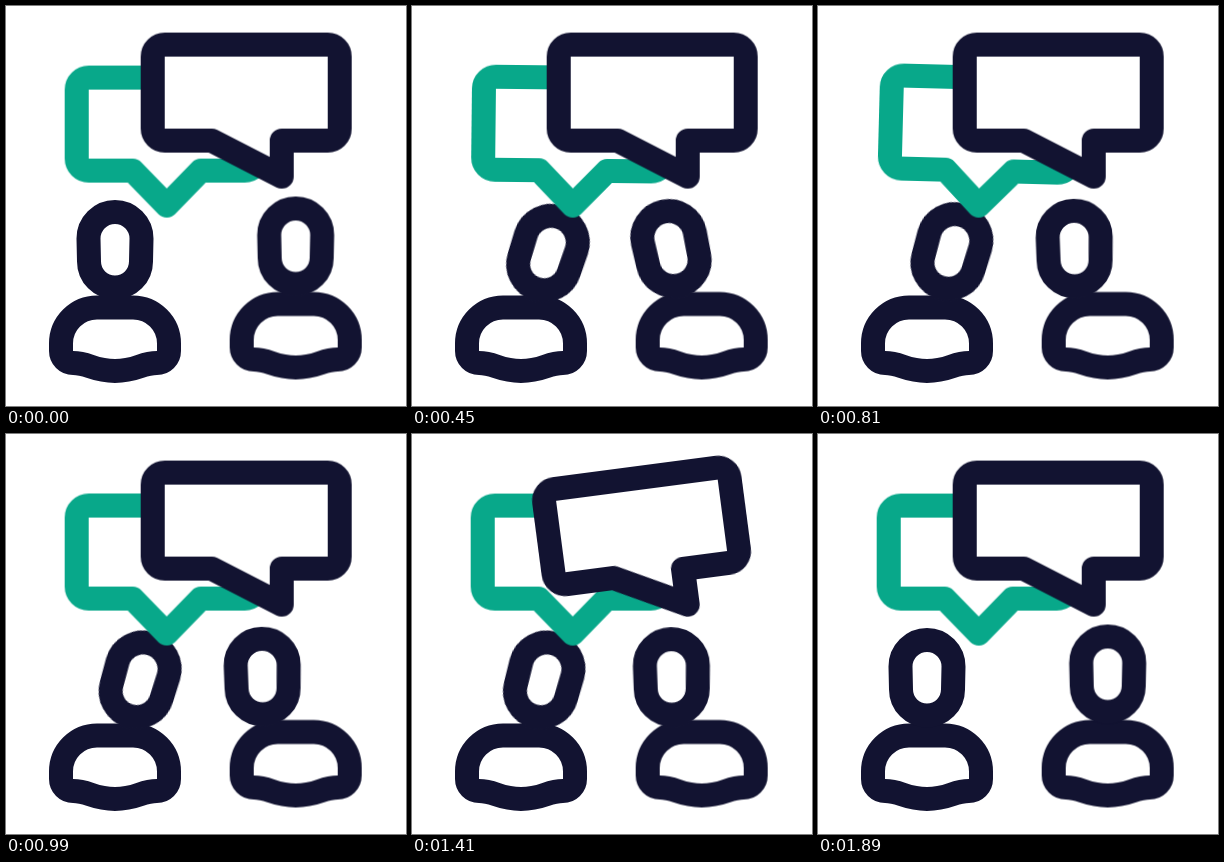
An HTML page that plays this animation: 400x400 px, repeating every 1920 ms.

```html
<!DOCTYPE html>
<html lang="en">
<head>
<meta charset="utf-8">
<title>Conversation</title>
<style>
  html, body { margin: 0; width: 100%; height: 100%; overflow: hidden; background: #fff; }
  svg { display: block; width: 100vw; height: 100vh; }
  path {
    fill: none;
    stroke: #121331;
    stroke-width: 24;
    stroke-linecap: round;
    stroke-linejoin: round;
  }
  .bubble { fill: #fff; }
  .reply { stroke: #08a88a; }

  .reply, .speech, .head, .body { animation: 1920ms ease-in-out infinite; }
  .head { transform-box: fill-box; transform-origin: center; }
  .reply { transform-origin: 161px 200px; animation-name: reply; }
  .speech { transform-origin: 276px 171px; animation-name: speech; }
  .left .head { animation-name: lean-left; }
  .right .head { animation-name: lean-right; }
  .right .body { transform-origin: 109px 377px; animation-name: breathe; }

  /* Damped swings around the tip of each bubble */
  @keyframes reply {
    0%, 0.5% { transform: rotate(0deg); }
    7.03% { transform: rotate(-20deg); }
    17.8% { transform: rotate(5.8deg); }
    28.1% { transform: rotate(-3deg); }
    41.7% { transform: rotate(1.5deg); }
    52%, 100% { transform: rotate(0deg); }
  }
  @keyframes speech {
    0%, 53.9% { transform: rotate(0deg); }
    60.94% { transform: rotate(14.1deg); }
    72.6% { transform: rotate(-7.6deg); }
    83.5% { transform: rotate(2.3deg); }
    92.5% { transform: rotate(-0.6deg); }
    98%, 100% { transform: rotate(0deg); }
  }

  /* The heads lean towards each other, then return */
  @keyframes lean-left {
    0% { transform: translate(0, 0) rotate(0deg); }
    14.06% { transform: translate(23.3px, 0.3px) rotate(14deg); }
    23.44% { transform: translate(26.8px, 3.3px) rotate(18deg); }
    42.19% { transform: translate(24.7px, 1.7px) rotate(16deg); }
    60.94%, 68.75% { transform: translate(25.2px, 2.3px) rotate(16.5deg); }
    91.7%, 100% { transform: translate(0, 0) rotate(0deg); }
  }
  @keyframes lean-right {
    0% { transform: translate(0, 0) rotate(0deg); }
    14.06% { transform: translate(-30px, -0.8px) rotate(-11deg); }
    23.44% { transform: translate(-30.5px, 2.3px) rotate(-12deg); }
    41%, 55.2% { transform: translate(-33.3px, 2.3px) rotate(-1deg); }
    60.94% { transform: translate(-33px, 9.8px) rotate(-0.5deg); }
    68.75% { transform: translate(-33px, 3px) rotate(-1deg); }
    91.7%, 100% { transform: translate(0, 0) rotate(0deg); }
  }
  @keyframes breathe {
    0%, 23.44%, 100% { transform: scale(1); }
    14.06% { transform: scale(0.985, 1.01); }
  }
</style>
</head>
<body>
<svg viewBox="0 0 400 400">
  <defs>
    <path id="head" d="M82.5 232.5a26.5 26.5 0 0 1 53 0L135 255.5a26 26 0 0 1-52 0Z"/>
    <path id="body" d="M55 345V337.5a36 36 0 0 1 36-36H127a36 36 0 0 1 36 36V345a12 12 0 0 1-12 12C135 357 131 365 109 365S83 357 67 357a12 12 0 0 1-12-12Z"/>
  </defs>
  <g class="left">
    <use class="body" href="#body"/>
    <g class="head"><use href="#head"/></g>
  </g>
  <g class="right" transform="translate(180.7 -3.5)">
    <use class="body" href="#body"/>
    <g class="head"><use href="#head"/></g>
  </g>
  <g transform="translate(-0.3 -0.4)">
    <path class="bubble reply" d="M83 72H239a12 12 0 0 1 12 12V153a12 12 0 0 1-12 12H195L161 200L127 165H83a12 12 0 0 1-12-12V84a12 12 0 0 1 12-12Z"/>
    <path class="bubble speech" d="M159 39H322a12 12 0 0 1 12 12V123a12 12 0 0 1-12 12H276V171L206 135H159a12 12 0 0 1-12-12V51a12 12 0 0 1 12-12Z"/>
  </g>
</svg>
</body>
</html>
```
